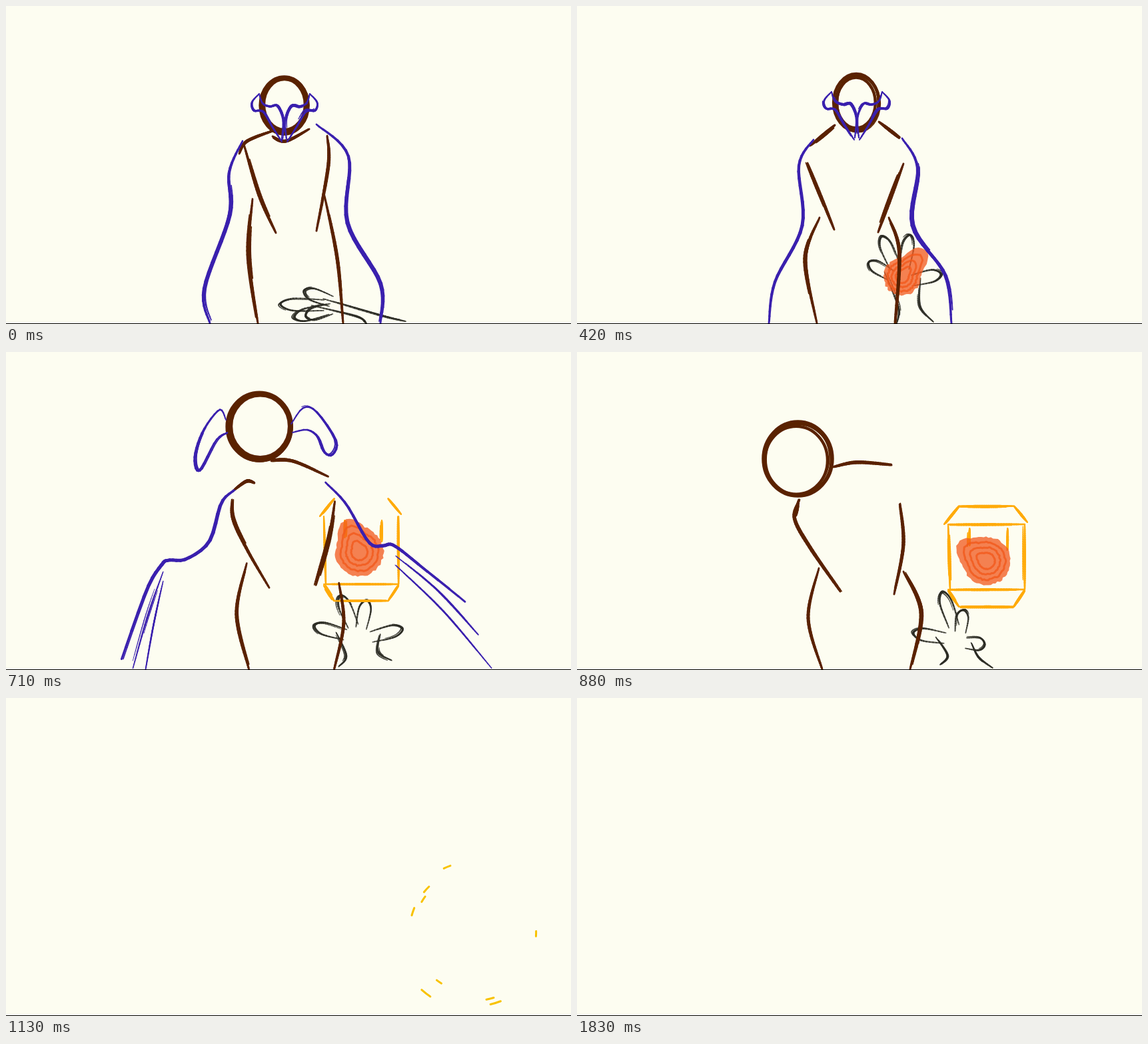
An HTML page with a canvas for the animation above (1.87 s loop, 848 by 478 pixels).

```html
<!DOCTYPE html>
<html lang="en">
<head>
<meta charset="utf-8">
<title>Sketch loop</title>
<style>
html, body { margin: 0; width: 100%; height: 100%; overflow: hidden; background: #fdfdf1 }
canvas { display: block }
</style>
</head>
<body>
<canvas id="stage" width="848" height="478"></canvas>
<script>
const ctx = document.getElementById('stage').getContext('2d');
const LOOP = 1870, STEP = 1000 / 24;
const BROWN = '#5a2200', BLUE = '#3a20ae', COAL = '#2c2c24', AMBER = '#ffab0a', FIRE = '#f2591c';
const KEYS = [0, 10, 14, 21, 25]; // drawings at which the poses are set
let seed = 1;

const rand = () => (seed = seed * 16807 % 2147483647) / 2147483647;
const wobble = a => (rand() * 2 - 1) * a;
const mix = (p, q, u) => p.map((v, i) => v + (q[i] - v) * u);
const points = s => s.split(' ').map(p => p.split(',').map(Number));
const mirror = pts => pts.map(([x, y]) => [-x, y]);

// Smooth curve through the points, evenly sampled so that any two curves can morph
function curve(s) {
  const p = points(s), m = p.length - 1;
  const get = i => p[Math.max(0, Math.min(m, i))];
  return Array.from({ length: 33 }, (_, k) => {
    const i = Math.min(m - 1, Math.floor(k / 32 * m)), u = k / 32 * m - i;
    const [a, b, c, d] = [get(i - 1), get(i), get(i + 1), get(i + 2)];
    return [0, 1].map(j => b[j] + .5 * u * (c[j] - a[j] +
      u * (2 * a[j] - 5 * b[j] + 4 * c[j] - d[j] + u * (3 * (b[j] - c[j]) + d[j] - a[j]))));
  });
}

function pose(list, n) {
  const last = list.length - 1;
  let i = KEYS.length - 1;
  while (KEYS[i] > n) i--;
  if (i >= last) return list[last];
  const u = (n - KEYS[i]) / (KEYS[i + 1] - KEYS[i]);
  return list[i].map((p, j) => mix(p, list[i + 1][j], u));
}

function brush(pts, w) {
  const m = pts.length - 1;
  for (let i = 0; i < m; i++) {
    ctx.lineWidth = w * (.55 + .45 * Math.sin(Math.PI * i / m));
    ctx.beginPath();
    ctx.moveTo(...pts[i]);
    ctx.lineTo(...pts[i + 1]);
    ctx.stroke();
  }
}

// One firm stroke and two loose, partial repeats
function sketch(pts, w, color) {
  ctx.strokeStyle = color;
  brush(pts, w);
  for (let k = 0; k < 2; k++) {
    const dx = wobble(3), dy = wobble(2), cut = () => Math.floor(rand() * pts.length * .4);
    brush(pts.slice(cut(), pts.length - cut()).map(([x, y]) => [x + dx, y + dy]), w * .55);
  }
}

const rough = (s, w, color) => sketch(curve(s), w, color);
const body = [
  ['350,222 362,203 405,186', '350,210 387,179', '345,200 385,163 408,157', '333,222 326,250'],
  ['400,196 420,203 455,185', '453,174 484,198', '408,157 440,163 492,200', '385,173 420,166 472,170'],
  ['357,208 380,285 405,341', '346,236 386,336', '343,222 358,270 395,350', '334,222 326,250 350,295 395,360'],
  ['482,195 484,240 466,338', '490,237 452,340', '500,222 457,340', '485,228 490,290 476,364'],
  ['370,290 364,375 378,477', '364,318 343,380 360,477', '360,312 345,390 362,477', '363,325 347,400 368,477'],
  ['478,285 497,380 506,477', '468,318 484,370 478,477', '507,360 500,420 487,477', '490,330 516,392 500,477']
].map(part => part.map(curve));

const wings = [
  { spread: [17, 14], poses: [
    '355,203 335,250 335,315 297,425 306,477',
    '355,201 333,240 338,330 297,415 288,477',
    '348,197 320,215 297,292 245,311 205,285 188,261 150,292 86,450',
    '333,222 300,330 290,477'] },
  { spread: [20, 50], poses: [
    '466,178 514,226 513,325 563,417 562,477',
    '488,199 511,243 503,330 552,404 562,477',
    '480,172 525,210 572,283 600,262 624,223 680,225 808,299',
    '479,228 520,330 530,477'] }
].map(w => ({ ...w, poses: w.poses.map(curve) }));

// The face is placed from the middle of the head
const brow = curve('38,-17 33,-3 22,2 10,1 1,22 3,52');
const cheek = curve('38,-17 49,-4 46,8 32,10 18,33 4,55');
const ears = [
  [mirror(cheek), mirror(cheek), curve('-50,-11 -60,-26 -85,7 -97,45 -90,65 -65,20 -48,8')],
  [cheek, cheek, curve('48,-5 66,-29 86,-23 115,20 110,41 98,38 88,15 72,4 50,8')]
];

// Middle, then radii
const head = ['418,149 34,41', '420,146 32,41', '417,77 44,46', '331,161 50,54'].map(points);
// Palm, three fingertips, thumb, both sides of the wrist
const hand = [
  '505,452 412,448 432,468 450,466 447,428 541,477 600,474',
  '485,415 438,385 458,346 500,344 546,403 480,477 535,475',
  '495,430 432,403 467,370 513,363 583,398 465,475 545,455',
  '572,435 505,422 548,360 580,388 612,440 545,470 624,475'
].map(points);
// Two corners of the glass
const lantern = ['440,450 470,477', '460,370 525,432', '417,238 527,343', '557,259 672,357', '645,305 760,403'].map(points);
// Middle, size, tip
const flame = ['465,465 14,0 480,440', '488,407 28,0 522,366', '467,291 36,0 464,224', '615,314 36,0 572,288', '702,360 38,0 665,325'].map(points);

function drawBody(n) {
  for (const part of body) sketch(pose(part, n), 5, BROWN);
  const [[x, y], [rx, ry]] = pose(head, n);
  for (let k = 0; k < 5; k++) {
    ctx.lineWidth = k < 3 ? 4.5 : 1.5;
    ctx.beginPath();
    ctx.ellipse(x + wobble(2), y + wobble(2), rx + 2 - k % 3 * 2.5, ry + 2 - k % 3 * 2.5, 0, 0, 7);
    ctx.stroke();
  }
}

function drawWings(n) {
  const open = Math.max(0, Math.min(1, (n - 10) / 4));
  for (const { spread, poses } of wings) {
    const pts = pose(poses, n), elbow = pts[22], tip = pts[32];
    sketch(pts, 5, BLUE);
    for (let k = 1; k <= 2; k++) {
      const end = tip.map((v, j) => v + spread[j] * k * open);
      const from = [elbow[0], elbow[1] + 14 * k * open];
      const mid = mix(from, end, .5);
      if (open) rough([from, [mid[0], mid[1] - 8], end].join(' '), 2.5, BLUE);
    }
  }
}

function drawFace(n) {
  ctx.save();
  ctx.translate(...pose(head, n)[0]);
  for (const ear of ears) sketch(pose(ear, n), 3.5, BLUE);
  if (n < 12) for (const side of [brow, mirror(brow)]) sketch(side, 3.5, BLUE);
  ctx.restore();
}

function drawHand(n) {
  const [palm, ...rest] = pose(hand, n), tips = rest.slice(0, 4), wrist = rest.slice(4);
  ctx.globalAlpha = .8;
  for (const tip of tips) {
    const dx = tip[0] - palm[0], dy = tip[1] - palm[1], d = Math.hypot(dx, dy);
    const at = (along, side) => [palm[0] + dx * along - dy / d * side, palm[1] + dy * along + dx / d * side];
    rough([at(.3, 9), at(.8, 9), at(1, 0), at(.8, -9), at(.3, -7)].join(' '), 3, COAL);
  }
  wrist.forEach((w, i) => rough([mix(palm, tips[i * 3], .5), mix(palm, w, .6), w].join(' '), 3, COAL));
  ctx.globalAlpha = 1;
}

function drawLantern(n) {
  const [[l, t], [r, b]] = pose(lantern, n), d = (r - l) * .14;
  const edges = [
    [[l, t], [l + 3, b]], [[r, t], [r, b]], [[l, b], [r, b]],
    [[l, b + 2], [l + d, b + 1.6 * d], [r - d, b + 1.6 * d], [r, b + 2]],
    [[l + 2 * d, t + 6], [l + 2 * d, t + 32]], [[r - 1.6 * d, t + 6], [r - 1.6 * d, t + 38]],
    [[l - 6, t], [l + d, t - 1.7 * d]], [[r + 4, t - 3], [r - d, t - 1.7 * d]]
  ];
  if (n > 17) edges.push([[l, t], [r, t]], [[l + d, t - 1.7 * d], [r - d, t - 1.7 * d]]);
  for (const e of edges) for (let i = 1; i < e.length; i++) rough(e.slice(i - 1, i + 1).join(' '), 3.8, AMBER);
}

// A round body that narrows to its tip
function drawFlame(n) {
  const [[x, y], [size], tip] = pose(flame, n);
  const reach = Math.hypot(tip[0] - x, tip[1] - y), lean = Math.atan2(tip[1] - y, tip[0] - x);
  ctx.fillStyle = ctx.strokeStyle = FIRE;
  for (let k = 0; k < 4; k++) {
    ctx.beginPath();
    for (let a = 0; a < 6.28; a += .1) {
      const radius = (size + (reach - size) * Math.max(0, Math.cos(a)) ** 9 + wobble(1.5)) * (1 - k * .22);
      ctx.lineTo(x + Math.cos(lean + a) * radius, y + Math.sin(lean + a) * radius);
    }
    ctx.closePath();
    ctx.globalAlpha = k ? .8 : .75;
    ctx.lineWidth = 3;
    k ? ctx.stroke() : ctx.fill();
  }
  ctx.globalAlpha = 1;
}

// Ring of embers that grows while it breaks apart
function drawBurst(n) {
  const age = n - 24, r = 110 * (1 - .5 ** (age + 1));
  ctx.strokeStyle = '#f8c200';
  for (let k = 0; k < 32 * .65 ** age; k++) {
    const a = rand() * 6.283, len = (.3 + rand() * .3) / (age + 1);
    ctx.lineWidth = 3;
    ctx.beginPath();
    ctx.arc(702, 352, r + wobble(14), a, a + len);
    ctx.stroke();
  }
}

function render(n) {
  seed = 911 + n * 7919;
  ctx.fillStyle = '#fdfdf1';
  ctx.fillRect(0, 0, 848, 478);
  ctx.lineCap = ctx.lineJoin = 'round';
  const parts = [
    [drawHand, 0, 24], [drawLantern, 12, 24], [drawFlame, 6, 24], [drawBody, 0, 24],
    [drawWings, 0, 18], [drawFace, 0, 18], [drawBurst, 24, 29]
  ];
  for (const [draw, from, to] of parts) if (n >= from && n < to) draw(n);
  ctx.fillStyle = '#000';
  ctx.fillRect(0, 477, 848, 1);
}

const start = performance.now();
let shown = -1;
function tick() {
  const t = (performance.now() - start) % LOOP;
  const n = Math.min(44, Math.floor((t + 5) / STEP));
  if (n !== shown) render(shown = n);
  requestAnimationFrame(tick);
}
tick();
</script>
</body>
</html>
```
